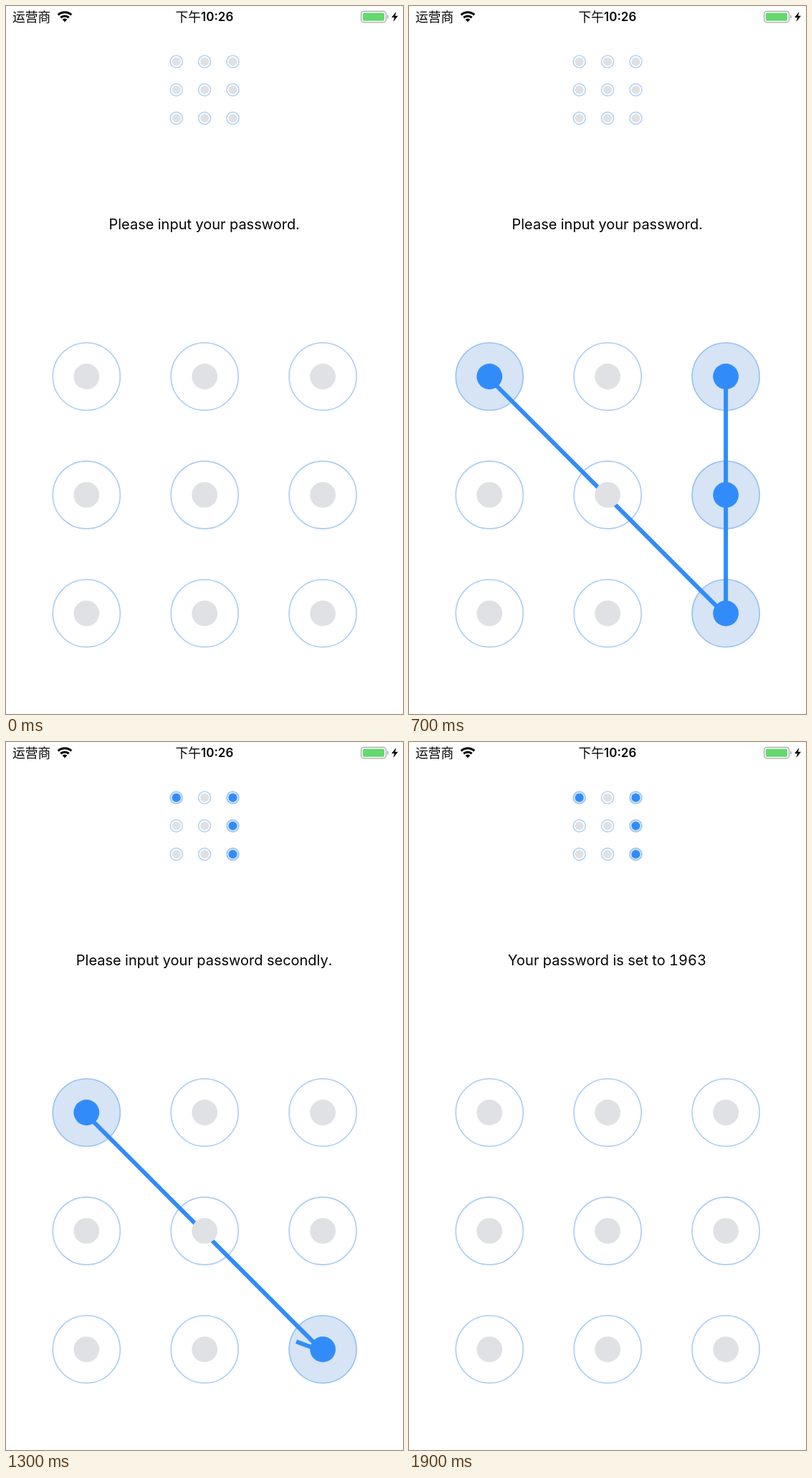
These frames come from a looping animation (554x986 px, 2 s). An HTML page with a canvas:

```html
<!DOCTYPE html>
<html lang="en">
<head>
<meta charset="utf-8">
<title>Pattern lock</title>
<style>
  html, body { margin: 0; width: 100%; height: 100%; overflow: hidden; background: #fff; }
  canvas { display: block; width: 554px; height: 986px; }
  #message {
    position: absolute; left: 0; top: 289px; width: 553px;
    font: 400 20px/30px Inter, "Noto Sans", sans-serif;
    font-variant-numeric: tabular-nums;
    text-align: center; white-space: nowrap; color: #050505;
  }
</style>
</head>
<body>
<canvas id="stage"></canvas>
<div id="message"></div>
<script>
const W = 554, H = 986, LOOP = 2000, STEP = 100;
const WHITE = '#fff', BLUE = '#318cfa', GREY = '#e0e1e5';
const RING = '#a9cdf4', RING_ON = '#94c1f3', PALE = '#d6e4f6';
const LATIN = 'Inter, "Noto Sans", sans-serif';
const CJK = '"Noto Sans CJK SC", "Noto Sans CJK", sans-serif';

const canvas = document.getElementById('stage');
const label = document.getElementById('message');
const ctx = canvas.getContext('2d');
const dpr = window.devicePixelRatio || 1;
canvas.width = W * dpr;
canvas.height = H * dpr;

const makeGrid = (x, y, gap) => Array.from({ length: 9 }, (_, i) =>
  ({ x: x + (i % 3) * gap, y: y + Math.floor(i / 3) * gap }));
const pad = makeGrid(112.3, 516, 164.9);
const preview = makeGrid(237.7, 77.4, 39.4);
const HIT = 47;
const LINE_DROP = 3; // the line joins the nodes slightly below centre
const SAVED = [0, 8, 5, 2];

// Finger position on each step of a drag
const drags = [
  { start: 1, tips: [[128, 568], [225, 740], [372, 812], [425, 842], [438, 720], [437, 585], [441.7, 520], [441.7, 516]] },
  { start: 10, tips: [[112, 530], [185, 690], [323, 789], [405, 835], [440, 800], [437, 706], [437, 590], [441, 530], [441.7, 516]] }
];

function disc(x, y, r, fill) {
  ctx.beginPath();
  ctx.arc(x, y, r, 0, Math.PI * 2);
  ctx.fillStyle = fill;
  ctx.fill();
}

function ring(p, r, on, width) {
  disc(p.x, p.y, r, on ? PALE : WHITE);
  ctx.strokeStyle = on ? RING_ON : RING;
  ctx.lineWidth = width;
  ctx.stroke();
}

function text(str, x, y, font) {
  ctx.font = font;
  ctx.fillStyle = '#050505';
  ctx.fillText(str, x, y);
}

function wifi(x, y) {
  const a = -Math.PI / 2, half = 0.76;
  ctx.fillStyle = '#000';
  for (const [inner, outer] of [[0, 4.8], [6.8, 9.8], [11.9, 15]]) {
    ctx.beginPath();
    ctx.arc(x, y, outer, a - half, a + half);
    ctx.arc(x, y, inner, a + half, a - half, true);
    ctx.fill();
  }
}

function battery() {
  ctx.beginPath();
  ctx.roundRect(495.6, 7.4, 34.8, 15.4, 4);
  ctx.strokeStyle = '#a6a6a6';
  ctx.lineWidth = 1.3;
  ctx.stroke();
  ctx.beginPath();
  ctx.roundRect(497.8, 9.5, 30.2, 11.2, 2);
  ctx.fillStyle = '#65d86e';
  ctx.fill();
  ctx.beginPath();
  ctx.ellipse(532, 15.1, 1.7, 2.8, 0, -Math.PI / 2, Math.PI / 2);
  ctx.fillStyle = '#a6a6a6';
  ctx.fill();

  ctx.beginPath();
  [[544.4, 8], [538, 16], [542, 16], [540.4, 22], [547, 13.7], [543, 13.7]]
    .forEach(([x, y]) => ctx.lineTo(x, y));
  ctx.closePath();
  ctx.fillStyle = '#000';
  ctx.fill();
}

function statusBar() {
  text('运营商', 9, 21.6, '400 17.8px ' + CJK);
  wifi(82, 22.2);
  text('下午', 236.5, 21.6, '500 17.8px ' + CJK);
  text('10:26', 272, 21.2, '600 17px ' + LATIN);
  battery();
}

// Nodes touched so far, with the finger as the free end
function dragState(step) {
  const drag = drags.find(d => step >= d.start && step < d.start + d.tips.length);
  if (!drag) return { nodes: [], finger: null };
  const tips = drag.tips.slice(0, step - drag.start + 1);
  const nodes = [0];
  for (const [x, y] of tips) {
    const i = pad.findIndex(p => Math.hypot(p.x - x, p.y - y) < HIT);
    if (i >= 0 && !nodes.includes(i)) nodes.push(i);
  }
  return { nodes, finger: tips[tips.length - 1] };
}

function drawPad({ nodes, finger }) {
  pad.forEach((p, i) => ring(p, 47, nodes.includes(i), 1.6));
  if (finger) {
    ctx.beginPath();
    nodes.forEach(i => ctx.lineTo(pad[i].x, pad[i].y + LINE_DROP));
    ctx.lineTo(...finger);
    ctx.strokeStyle = BLUE;
    ctx.lineWidth = 6;
    ctx.lineJoin = 'bevel';
    ctx.stroke();
  }
  pad.forEach((p, i) => disc(p.x, p.y, 17.9, nodes.includes(i) ? BLUE : GREY));
}

function drawPreview(nodes) {
  preview.forEach((p, i) => {
    const on = nodes.includes(i);
    ring(p, 8.5, on, 1.4);
    disc(p.x, p.y, 6, on ? BLUE : GREY);
  });
}

function message(step) {
  if (step < 9) return 'Please input your password.';
  if (step < 19) return 'Please input your password secondly.';
  return 'Your password is set to 1963';
}

function draw(ms) {
  const step = Math.floor((ms % LOOP) / STEP);
  ctx.setTransform(dpr, 0, 0, dpr, 0, 0);
  ctx.fillStyle = WHITE;
  ctx.fillRect(0, 0, W, H);
  statusBar();
  drawPreview(step < 9 ? [] : SAVED);
  drawPad(dragState(step));
  label.textContent = message(step);
}

const begin = performance.now();
function tick() {
  draw(performance.now() - begin);
  requestAnimationFrame(tick);
}
tick();
</script>
</body>
</html>
```
